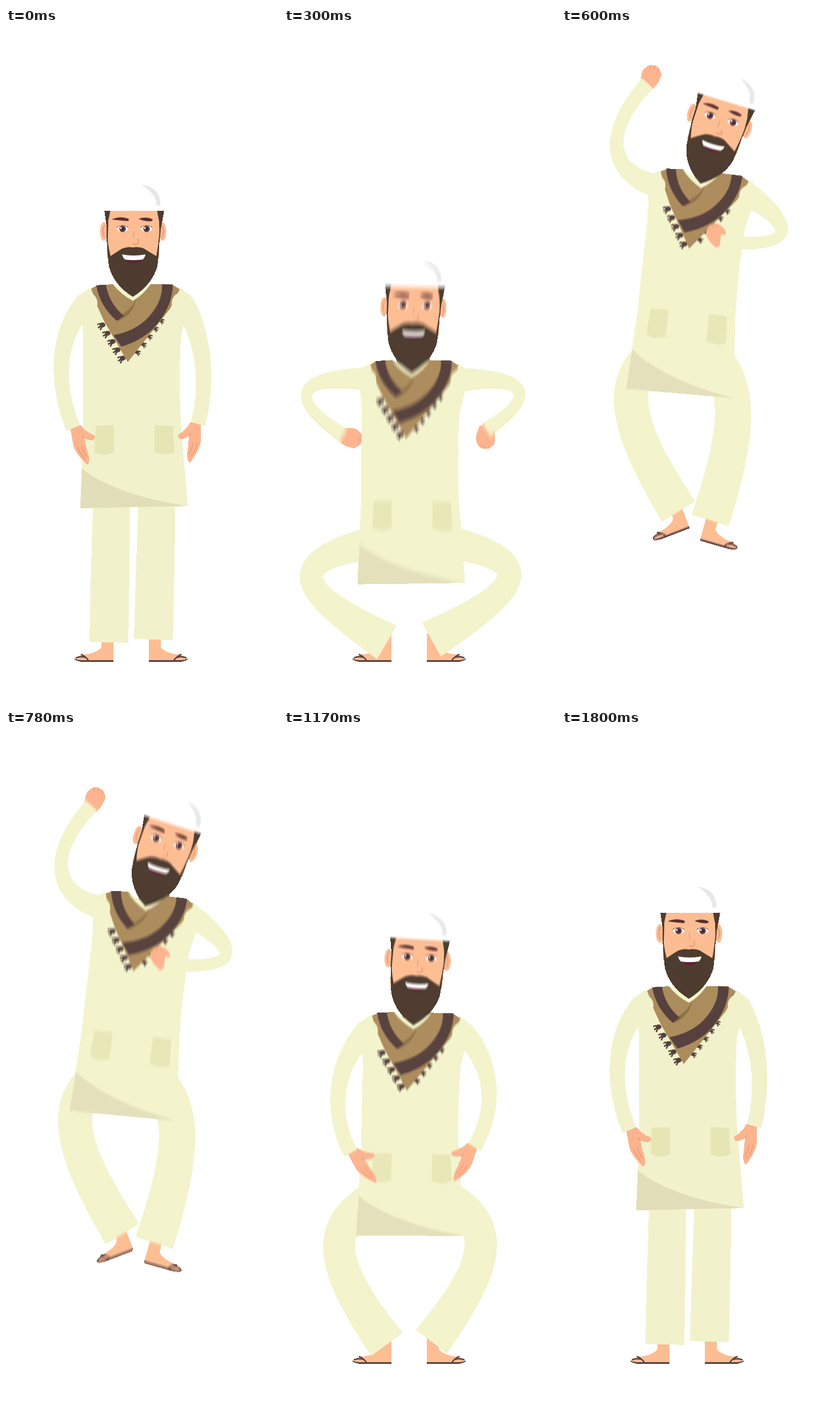
These frames come from a looping animation (476x1176 px, 2.43 s). An HTML page with a canvas:

```html
<!DOCTYPE html>
<html lang="en">
<head>
<meta charset="utf-8">
<title>Jumping man</title>
<style>
html, body { margin: 0; width: 100%; height: 100%; overflow: hidden; background: #fff; }
canvas { display: block; width: 476px; height: 1176px; }
</style>
</head>
<body>
<canvas id="stage" width="476" height="1176"></canvas>
<script>
const W = 476, H = 1176, LOOP = 2430, STEP = 30, REST = 1800;
const CLOTH = '#f1f2cb', SHADE = '#e2deba', POCKET = '#e6e6b5';
const SKIN = '#fdbd93', HAND = '#fbb48e', LINE = '#e9906c';
const HAIR = '#4d3c2f', DARK = '#57413f', SCARF = '#ab8c5c', FOLD = '#8f7148';
const SHUTTER = 16, SAMPLES = 7, FULL_AIR = 164;
const rad = Math.PI / 180;
const clamp = (v, lo, hi) => Math.max(lo, Math.min(hi, v));

// Smooth curve through [time, values...] keys, without overshoot.
function track(keys) {
  const last = keys.length - 1;
  const rise = (i, c) => (keys[i + 1][c] - keys[i][c]) / (keys[i + 1][0] - keys[i][0]);
  const slope = (i, c) => {
    if (i === 0 || i === last) return 0;
    const a = rise(i - 1, c), b = rise(i, c);
    return a * b <= 0 ? 0 : 2 * a * b / (a + b);
  };
  return t => {
    t = clamp(t, 0, keys[last][0]);
    let i = 0;
    while (i < last - 1 && t > keys[i + 1][0]) i++;
    const a = keys[i], b = keys[i + 1], h = b[0] - a[0], u = (t - a[0]) / h, v = 1 - u;
    return a.slice(1).map((p, k) => {
      const c = k + 1;
      return p * (1 + 2 * u) * v * v + b[c] * u * u * (3 - 2 * u)
        + h * (slope(i, c) * u * v * v - slope(i + 1, c) * u * u * v);
    });
  };
}

// Drop below standing height, and how far the body leans into the jump.
const jump = track([
  [0, 0, 0], [240, 160, .04], [300, 133, .07], [450, -114, .65], [640, -204, .97],
  [780, -163, 1], [1050, 140, .36], [1170, 46, .2], [1380, 0, .1], [REST, 0, 0]
]);

// Wrist place (moving with the body) and hand direction, left then right.
const hang = [118, 698, 90, 336, 691, 81];
const akimbo = [104, 578, 17, 354, 568, 94];
const swing = [115, 388, -77, 275, 546, 240];
const cheer = [150, 295, -65, 277, 571, 240];
const settle = [117, 692, 71, 333, 682, 99];
const hands = track([
  [0, ...hang], [300, ...akimbo], [450, ...swing], [570, ...cheer],
  [780, ...cheer], [1170, ...settle], [REST, ...hang]
]);

function layer() {
  const c = document.createElement('canvas');
  c.width = W; c.height = H;
  return c.getContext('2d', { willReadFrequently: true });
}
const g = layer(), mix = layer();
const out = document.getElementById('stage').getContext('2d');

function fill(d, color) {
  g.fillStyle = color;
  g.fill(new Path2D(d));
}
function line(d, color, width) {
  g.strokeStyle = color;
  g.lineWidth = width;
  g.stroke(new Path2D(d));
}
function oval(x, y, rx, ry, color) {
  g.fillStyle = color;
  g.beginPath();
  g.ellipse(x, y, rx, ry, 0, 0, 7);
  g.fill();
}
function group(x, y, angle, flip, draw) {
  g.save();
  g.translate(x, y);
  g.rotate(angle * rad);
  if (flip) g.scale(-1, 1);
  draw();
  g.restore();
}

// How far a limb of a fixed length bulges when its ends come closer.
const bulge = (a, b, length) =>
  Math.sqrt(Math.max(0, length ** 2 - Math.hypot(b[0] - a[0], b[1] - a[1]) ** 2)) / 2;
const toward = (a, b, u, dx, dy) => [a[0] + (b[0] - a[0]) * u + dx, a[1] + (b[1] - a[1]) * u + dy];

// A soft tube along a cubic curve; widths at its start, middle and end.
function tube(a, b, c, d, w0, wm, w1) {
  const left = [], right = [];
  for (let i = 0; i <= 40; i++) {
    const u = i / 40, v = 1 - u;
    const w = (w0 * v * (1 - 2 * u) + 4 * wm * u * v + w1 * u * (2 * u - 1)) / 2;
    const [x, y] = [0, 1].map(k => a[k] * v ** 3 + 3 * b[k] * v * v * u + 3 * c[k] * v * u * u + d[k] * u ** 3);
    const [dx, dy] = [0, 1].map(k => (b[k] - a[k]) * v * v + 2 * (c[k] - b[k]) * v * u + (d[k] - c[k]) * u * u);
    const n = Math.hypot(dx, dy) || 1;
    left.push([x - dy / n * w, y + dx / n * w]);
    right.unshift([x + dy / n * w, y - dx / n * w]);
  }
  g.fillStyle = CLOTH;
  g.beginPath();
  left.concat(right).forEach(q => g.lineTo(q[0], q[1]));
  g.closePath();
  g.fill();
}

function leg(hip, ankle, length, side) {
  const b = bulge(hip, ankle, length);
  tube(hip, toward(hip, ankle, .2, side * b * 1.7, 0), toward(hip, ankle, .55, side * b * 1.1, 0),
    ankle, 61, 66 - .0016 * b * b, 68);
}

function arm(shoulder, wrist, length, side, lean) {
  const b = .8 * bulge(shoulder, wrist, length);
  const dx = side * b * 4 / 3, dy = b * 4 / 3 * clamp(1.2 * lean - .4, -.4, .35);
  oval(shoulder[0], shoulder[1], 19, 19, CLOTH);
  tube(shoulder, toward(shoulder, wrist, .3, dx, dy), toward(shoulder, wrist, .7, dx, dy),
    wrist, 40, 29 - .0014 * b * b, 26);
}

function foot() {
  fill('M-13 -50H8V-2H-57Q-60 -8 -48 -12Q-20 -15 -13 -26Z', SKIN);
  fill('M-60 -7Q-59 -3 -44 -3H8V0H-44Q-61 -1 -60 -7Z', DARK);
  line('M-49 -13Q-41 -10 -36 -3M-58 -7Q-48 -11 -39 -7', DARK, 2.4);
}

function openHand() {
  fill('M-6 -3L13 -5Q20 6 37 13Q40 18 34 21Q26 22 19 18Q22 34 27 49Q29 62 24 64Q5 46 0 31Z', HAND);
  line('M7 32Q11 45 21 54M14 31Q17 42 24 50M19 18L15 14', LINE, 1.1);
}
function fist() {
  fill('M-12 -6H12L17 12Q18 22 10 30Q2 35 -7 32L-16 24V9Z', HAND);
  line('M-7 32L-6 26M1 33V27M9 30L7 25', LINE, 1.1);
}

function tassel(x, y, size) {
  g.save();
  g.translate(x, y);
  g.scale(size, Math.abs(size));
  oval(2, -1, 5, 4.2, DARK);
  line('M2 -1Q-4 -5 -7 -1M1 0L-6 4M2 0Q-1 5 -2 8', DARK, 2.6);
  g.restore();
}

function shirt() {
  fill('M149 454L187 447L222 466L253 447L304 454Q319 458 320 480L306 537Q302 610 306 690L318 834L130 838L135 700V533L130 480Q132 457 149 454Z', CLOTH);
  fill('M157 694L189 693V740Q172 749 155 740Z', POCKET);
  fill('M260 693L292 694L295 740Q278 748 260 740Z', POCKET);
  fill('M133 769Q192 815 318 834L130 838Z', SHADE);
}

function scarf() {
  for (let i = 0; i < 5; i++) {
    tassel(167 + i * 8.8, 519 + i * 14.5, 1);
    tassel(272 - i * 10.4, 511 + i * 13.8, -.75);
  }
  fill('M149 455L160 449L187 447Q200 464 222 476Q240 466 253 447L290 447L304 456L287 490L213 583L172 512L160 486Z', SCARF);
  fill('M228 473Q222 500 197 511L192 505Q216 496 228 473Z', FOLD);
  fill('M158 449L175 448Q180 480 206 502L194 511Q164 485 158 449Z', DARK);
  fill('M273 447Q275 478 247 507Q225 529 188 536L202 556Q246 543 269 511Q291 482 292 448Z', DARK);
}

function eye(x) {
  oval(x, 350, 10, 5.6, '#fff');
  oval(x, 350.5, 5.8, 5.8, '#6b4246');
  oval(x, 350.5, 3, 3, '#40262b');
  oval(x - 3, 349, 1.6, 1.6, '#fff');
  line(`M${x - 10} 348Q${x} 341 ${x + 10} 348`, '#8b5146', 1.2);
}

function head() {
  oval(171, 355, 6.5, 16, SKIN);
  oval(274, 355, 6.5, 16, SKIN);
  line('M173 344Q166 352 172 365M272 344Q279 352 273 365', LINE, 1.6);
  fill('M179 315H268V400Q222 445 177 400Z', SKIN);
  fill('M172 317H183L179 336L178 372H176V345Z', HAIR);
  fill('M264 317H277L271 350L269 372L268 338Z', HAIR);
  fill('M176 350Q176 385 180 415Q188 448 222 469Q256 448 265 415Q269 385 269 350Q267 378 263 398Q248 389 240 384Q230 381 222 383Q213 381 203 385Q193 391 183 398Q178 380 176 350Z', HAIR);
  fill('M207 402H240Q235 410 222 411Q211 409 207 402Z', '#5d2435');
  fill('M203 395Q223 399 244 395Q243 401 239 404Q222 406 208 404Q204 400 203 395Z', '#fff');
  fill('M185 334Q200 327 215 333L214 337Q199 336 185 334Z', '#5c3030');
  fill('M232 333Q246 328 257 334L255 337Q242 338 232 333Z', '#5c3030');
  eye(204);
  eye(246);
  line('M223 354V366', LINE, 1.2);
  line('M230 368Q234 373 230 377Q226 378 222 376', LINE, 1.6);
  fill('M172 319Q172 272 225 271Q277 272 277 319Z', '#fff');
  fill('M236 273Q266 277 270 301V309Q267 311 263 309Q264 290 236 273Z', '#e7e8ea');
}

function draw(t) {
  g.clearRect(0, 0, W, H);
  const [drop, lean] = jump(t), lift = Math.min(drop, 0);
  const air = Math.min(1, -lift / FULL_AIR);
  const x = 224 - 19 * lean, y = 836 + drop, tilt = 6.6 * lean, nod = 17.8 * lean;
  const turned = (ox, oy, dx, dy, angle) => {
    const c = Math.cos(angle * rad), s = Math.sin(angle * rad);
    return [ox + dx * c - dy * s, oy + dx * s + dy * c];
  };
  const joint = (px, py) => turned(x, y, px - 224, py - 836, tilt);
  const torso = art => group(x, y, tilt, false, () => {
    g.translate(-224, -836);
    art();
  });

  // The feet tuck in and turn their toes down while in the air.
  const lx = 180 + 36 * air, ly = 1106 - 32 * air + lift, lt = -21 * air;
  const rx = 258 - 9 * air, ry = 1106 - 11 * air + lift, rt = 16 * air;
  group(lx, ly, lt, false, foot);
  group(rx, ry, rt, true, foot);
  leg(joint(186, 760), turned(lx, ly, 0, -34, lt), 312, -1);
  leg(joint(266, 760), turned(rx, ry, 0, -39, rt), 303, 1);
  torso(() => { shirt(); scarf(); });

  const h = hands(t), hand = t < 150 || t >= 1080 ? openHand : fist;
  const wristL = [h[0], h[1] + drop], wristR = [h[3], h[4] + drop];
  group(...wristL, h[2] - 90, false, hand);
  arm(joint(141, 480), wristL, 233, -1, lean);
  group(...wristR, h[5] - 90, true, hand);
  arm(joint(309, 480), wristR, 219, 1, lean);

  torso(() => group(225, 460, nod - tilt, false, () => {
    g.translate(-225, -460);
    head();
  }));
}

// Motion blur inside the figure, hard outline against the page.
function paint(t) {
  const n = t > 0 && t < 1380 ? SAMPLES : 1;
  mix.globalAlpha = 1;
  mix.clearRect(0, 0, W, H);
  for (let i = 0; i < n; i++) {
    draw(t + SHUTTER * ((i + .5) / n - .5));
    mix.globalAlpha = 1 / (i + 1);
    mix.globalCompositeOperation = 'destination-out';
    mix.fillRect(0, 0, W, H);
    mix.globalCompositeOperation = 'lighter';
    mix.drawImage(g.canvas, 0, 0);
  }
  const img = mix.getImageData(0, 0, W, H), px = img.data;
  for (let i = 3; i < px.length; i += 4) px[i] = px[i] > 115 ? 255 : 0;
  out.putImageData(img, 0, 0);
}

let shown = -1;
const start = performance.now();
function tick() {
  const t = (performance.now() - start) % LOOP;
  const step = Math.min(REST, Math.floor(t / STEP) * STEP);
  if (step !== shown) paint(shown = step);
  requestAnimationFrame(tick);
}
tick();
</script>
</body>
</html>
```
